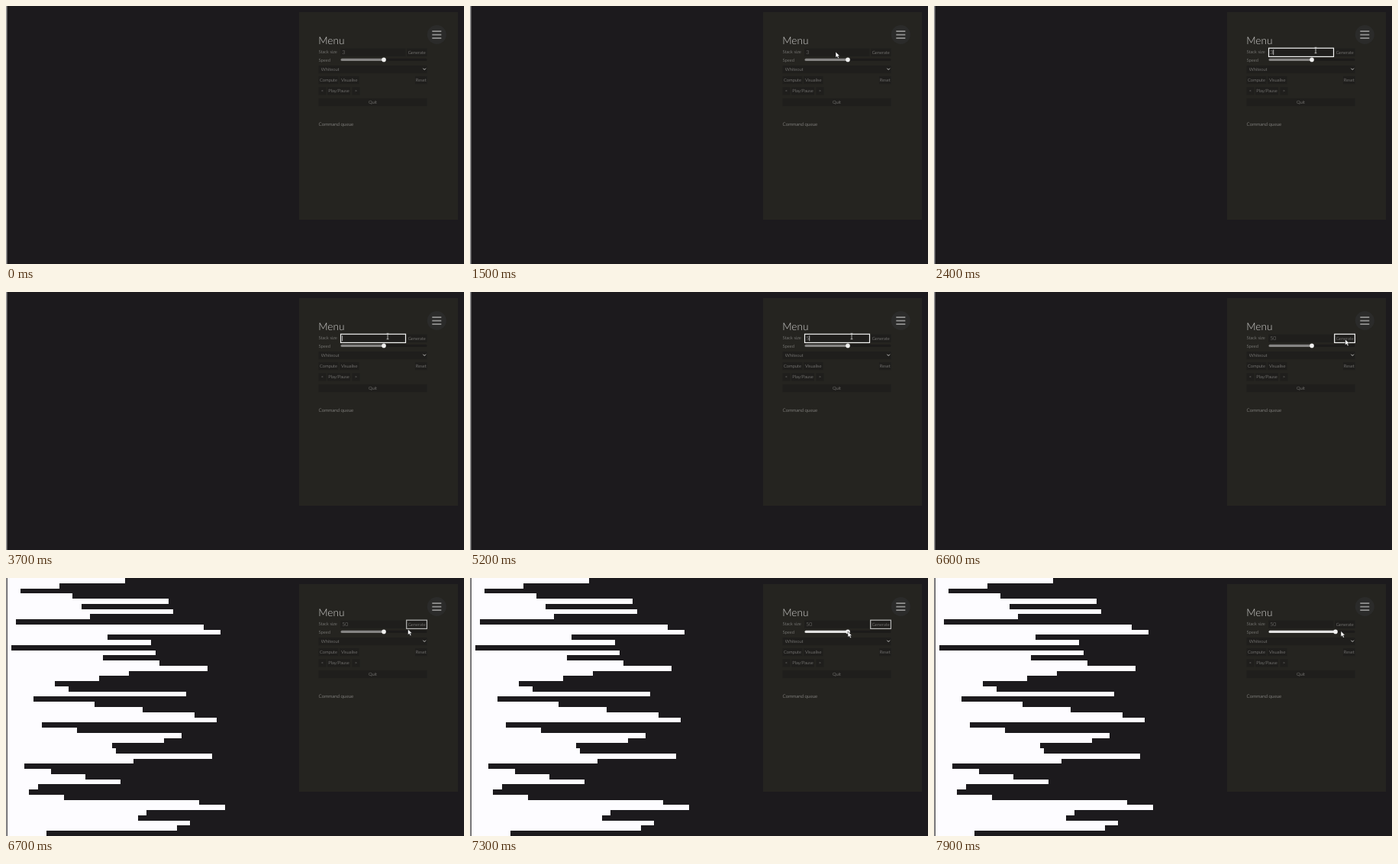
These frames come from a looping animation (600x338 px, 8 s). An HTML page:

```html
<!DOCTYPE html>
<html lang="en">
<head>
<meta charset="utf-8">
<title>Sorting visualiser menu</title>
<style>
  html, body { margin: 0; width: 100%; height: 100%; overflow: hidden; background: #1c1a1d; }
  svg { display: block; width: 100vw; height: 100vh; }
  text { font: 300 5.8px Lato, "Open Sans", sans-serif; fill: #aaa9a7; text-rendering: geometricPrecision; }
  #title { font-size: 13.6px; fill: #d5d4d2; }
  #queue { font-size: 6.2px; fill: #bbbab8; }
  #value { font-size: 7px; }
  .mid { text-anchor: middle; }
  .control { fill: #1f1e1c; }
  .ring { fill: none; stroke: #f4f4f4; stroke-width: 1.2; }
</style>
</head>
<body>
<svg viewBox="0 0 600 338">
  <rect width="600" height="338" fill="#1c1a1d"/>
  <rect width="1.5" height="338" fill="#99989a"/>
  <path id="bars" fill="#fdfcff" shape-rendering="crispEdges"/>

  <rect x="384" y="8" width="208" height="272" fill="#252420"/>
  <circle cx="564.3" cy="37.5" r="12.5" fill="#2b2b2a"/>
  <path d="M558.3 33.2h12M558.3 37.7h12M558.3 42.2h12" stroke="#929291" stroke-width="1.7"/>

  <text id="title" x="409.2" y="49.8">Menu</text>
  <text x="409.6" y="62.3">Stack size</text>
  <text x="409.6" y="73.2">Speed</text>
  <g id="controls"></g>
  <path d="M546.4 81.7l1.8 1.8 1.8-1.8" fill="none" stroke="#c8c8c6"/>
  <text x="412.8" y="85.2">Whiteout</text>
  <text id="queue" x="409.6" y="156.7">Command queue</text>

  <text id="value" x="440.3" y="63.3"></text>
  <path id="caret" d="M0 57.2v7" stroke="#ddd" stroke-width=".8"/>
  <rect id="inputRing" class="ring" x="438.5" y="55.2" width="85" height="11.2"/>
  <rect id="buttonRing" class="ring" x="524.7" y="55.2" width="26.7" height="11.2"/>

  <rect x="438.5" y="68.8" width="113" height="3.2" rx="1.6" fill="#1c1b1a"/>
  <rect id="fill" x="438.5" y="68.8" height="3.2" rx="1.6"/>
  <circle id="thumb" cy="70.4" r="2.8" fill="#f0f0ef"/>

  <path id="arrow" d="M0 0v7.6l1.8-1.6 1.3 2.8 1.4-.7-1.3-2.6h2.3z" fill="#fff" stroke="#111" stroke-width=".5"/>
  <path id="beam" d="M-1.4-3.7h2.8M0-3.7v7.4M-1.4 3.7h2.8" fill="none" stroke="#d8d8d8" stroke-width=".8"/>
</svg>
<script>
const $ = id => document.getElementById(id);
const LOOP = 8000, STEP = 100;

// x, y, width, label
const controls = [
  [438, 55.6, 85.5, ''], [525, 55.6, 26.5, 'Generate'],
  [409.5, 78, 142, ''],
  [409.5, 92, 26, 'Compute'], [437, 92, 25.5, 'Visualise'], [536, 92, 15.5, 'Reset'],
  [409.5, 106.3, 10, '<'], [421, 106.3, 30, 'Play/Pause'], [453.5, 106.3, 10, '>'],
  [409.5, 120.8, 142, 'Quit']
];
$('controls').innerHTML = controls.map(([x, y, w, label]) =>
  `<rect class="control" x="${x}" y="${y}" width="${w}" height="10.3"/>
   <text class="mid" x="${x + w / 2}" y="${y + 7.1}">${label.replace('<', '&lt;')}</text>`).join('');

const stack = [
  27, 12, 3, 15, 37, 17, 38, 19, 2, 45, 49, 23, 33, 1, 34, 22, 35, 46, 28, 21, 11, 14, 41, 6, 20,
  31, 43, 48, 8, 16, 40, 36, 24, 25, 47, 29, 4, 10, 18, 26, 7, 5, 13, 44, 50, 32, 30, 42, 39, 9
];
const rowHeight = 338 / stack.length;
$('bars').setAttribute('d', 'M1.5 0' + stack.map((n, i) =>
  `H${(1.6 + n * 5.71).toFixed(2)}V${((i + 1) * rowHeight).toFixed(2)}`).join('') + 'H1.5z');

// time, x, y
const pointerPath = [
  [700, 134, 234], [800, 430, 266], [1300, 548, 62], [1500, 479, 60], [1600, 466, 62],
  [1800, 458, 67], [2200, 458, 67], [2300, 482, 62], [2400, 500, 58], [5600, 500, 58],
  [5800, 506, 38], [5900, 512, 29], [6000, 520, 28], [6200, 534, 48], [6400, 538.7, 62],
  [6600, 538.7, 62], [6700, 526.5, 67], [6800, 512, 69], [7000, 499, 70], [7300, 495, 70],
  [7500, 495, 70], [7600, 501, 70], [7700, 511, 70], [7900, 533, 69.5]
];
const thumbPath = [[7600, 495], [7700, 501], [7800, 513], [7900, 526]];

function along(path, t) {
  const next = path.findIndex(key => key[0] > t);
  if (next <= 0) return path.at(next).slice(1);
  const [from, to] = [path[next - 1], path[next]];
  const k = (t - from[0]) / (to[0] - from[0]);
  return from.slice(1).map((v, i) => v + (to[i + 1] - v) * k);
}

const show = (id, on) => $(id).style.display = on ? '' : 'none';

function draw(t) {
  const within = (start, end) => t >= start && t < end;
  const editing = within(2000, 6600);

  const value = t < 3700 ? '3' : t < 5200 ? '' : t < 5300 ? '5' : '50';
  $('value').textContent = value;
  $('value').style.fill = editing ? '#cfcfcd' : '#8e8d8b';
  $('caret').setAttribute('transform', `translate(${440.6 + value.length * 4.1})`);
  show('caret', editing);
  show('inputRing', editing);
  show('buttonRing', within(6600, 7500));
  $('buttonRing').style.stroke = t < 6700 ? '#f4f4f4' : '#b5b5b4';
  show('bars', t >= 6700);

  const [thumbX] = along(thumbPath, t);
  $('thumb').setAttribute('cx', thumbX);
  $('fill').setAttribute('width', thumbX - 438.5);
  $('fill').setAttribute('fill', t < 6800 ? '#858483' : '#e2e2e1');

  const [x, y] = along(pointerPath, t);
  const overInput = within(1600, 5800);
  const visible = within(700, 900) || t >= 1300;
  for (const [id, on] of [['arrow', !overInput], ['beam', overInput]]) {
    $(id).setAttribute('transform', `translate(${x} ${y})`);
    show(id, visible && on);
  }
}

const start = performance.now();
function tick() {
  const elapsed = (performance.now() - start) % LOOP;
  draw(Math.floor(elapsed / STEP) * STEP);
  requestAnimationFrame(tick);
}
tick();
</script>
</body>
</html>
```
